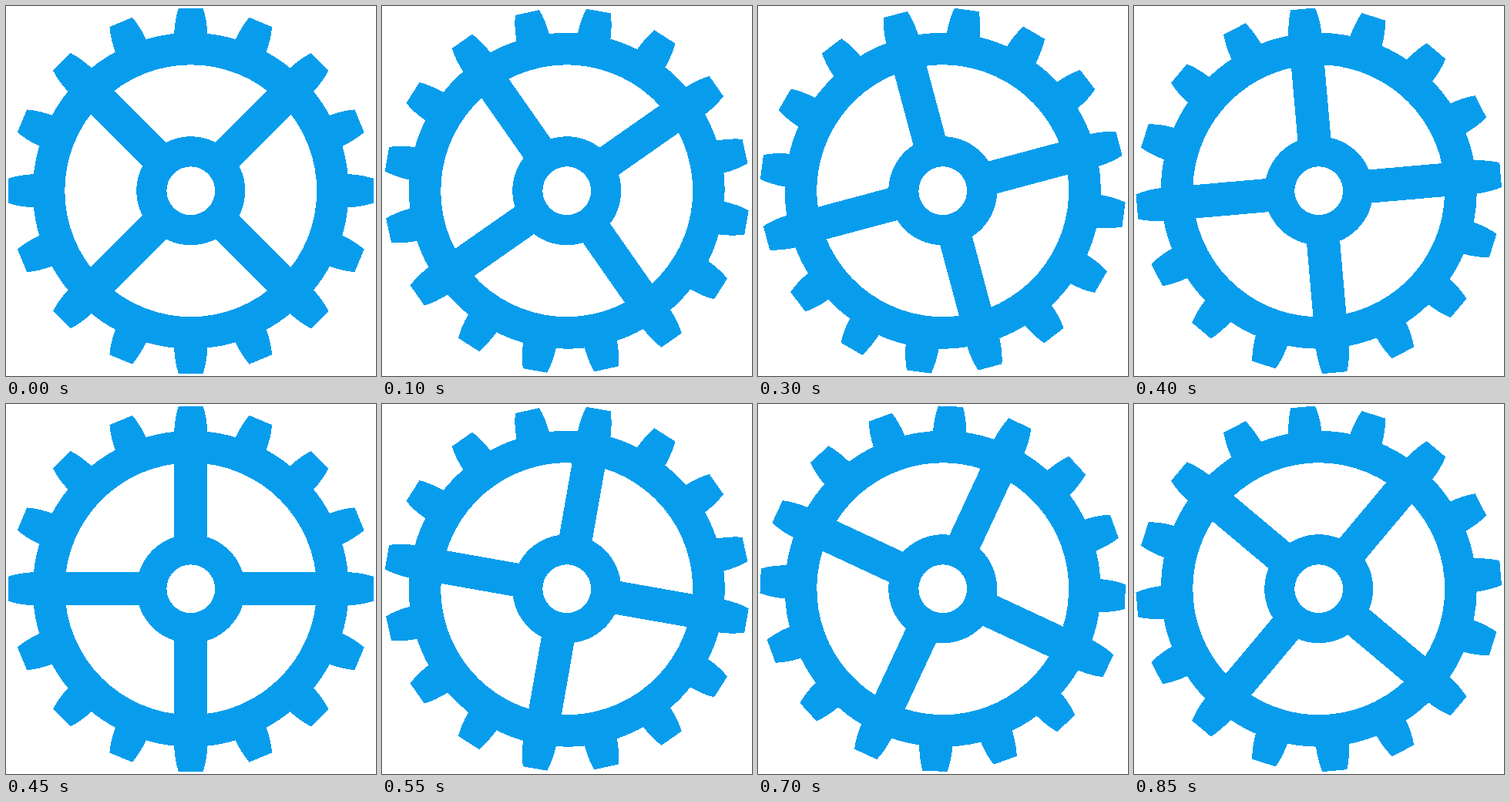
An HTML page for the animation above (0.9 s loop, 480 by 480 pixels).

```html
<!DOCTYPE html>
<html lang="en">
<head>
<meta charset="utf-8">
<title>Turning gear</title>
<style>
  html, body { margin: 0; width: 100%; height: 100%; overflow: hidden; background: #fff; }
  svg { display: block; width: 100vw; height: 100vh; }
</style>
</head>
<body>
<svg viewBox="0 0 480 480" shape-rendering="crispEdges">
  <defs>
    <path id="tooth" d="M-21.6-200V-204Q-20.8-222-16-236.8H16Q20.8-222 21.6-204V-200Z"/>
  </defs>
  <g id="gear" fill="#089dec" stroke="none">
    <g id="teeth"></g>
    <circle r="184.2" fill="none" stroke="#089dec" stroke-width="41.5"/>
    <path d="M-130-130L130 130M130-130L-130 130" stroke="#089dec" stroke-width="43.2"/>
    <circle r="70.5"/>
    <circle r="31.4" fill="#fff"/>
  </g>
</svg>
<script>
  const LOOP = 900, STEP = 50, DEG_PER_STEP = 5, TEETH = 16, CENTER = 239.75;
  const gear = document.getElementById('gear');

  document.getElementById('teeth').innerHTML = Array.from({ length: TEETH }, (_, i) =>
    `<use href="#tooth" transform="rotate(${i * 360 / TEETH})"/>`).join('');

  // A quarter turn per loop, in hard steps; the four spokes make it seamless.
  function draw(ms) {
    const angle = Math.floor((ms % LOOP) / STEP) * DEG_PER_STEP;
    gear.setAttribute('transform', `translate(${CENTER} ${CENTER}) rotate(${angle})`);
  }

  let start;
  function tick(now) {
    start ??= now;
    draw(now - start);
    requestAnimationFrame(tick);
  }
  draw(0);
  requestAnimationFrame(tick);
</script>
</body>
</html>
```
